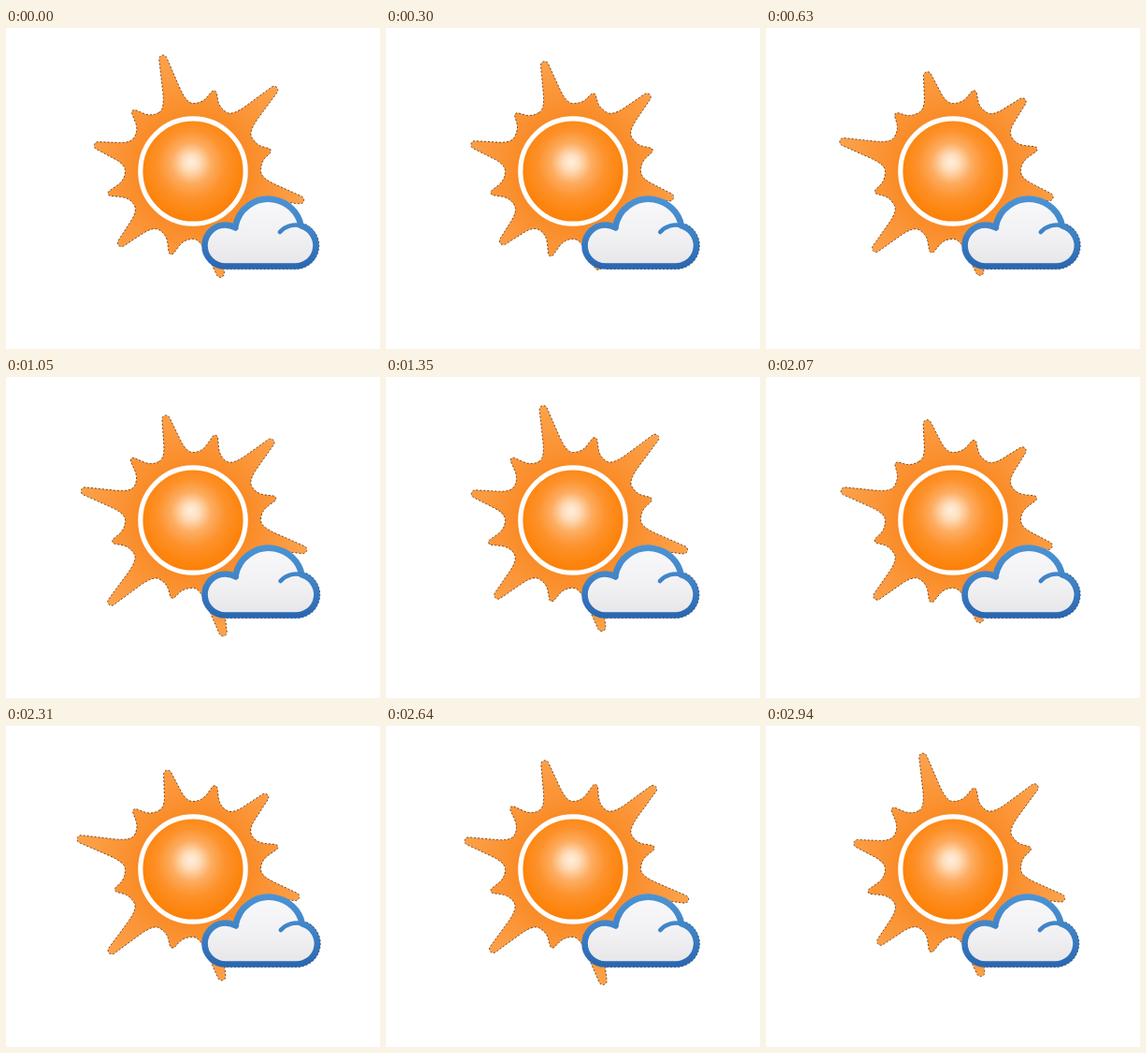
Write an HTML page with a canvas that moves like this. It is 400 by 343 pixels and loops after 2970 ms.

```html
<!DOCTYPE html>
<html lang="en">
<head>
<meta charset="utf-8">
<title>Sun and cloud</title>
<style>
html, body { margin: 0; width: 100%; height: 100%; overflow: hidden; background: #fff; }
canvas { display: block; }
</style>
</head>
<body>
<canvas id="stage" width="400" height="343"></canvas>
<script>
const ctx = document.getElementById('stage').getContext('2d');
const TAU = Math.PI * 2, DEG = Math.PI / 180;
const CX = 200, CY = 153;
const LOOP = 2970, STEP = 30, CYCLES = 2;
const VALLEY = 72.5;

const LONG = { mid: 118.5, amp: 9.7, start: 0, lag: 0.09, tip: 4.2, cap: 80, ctrl: [71.8, 12], bend: 0.36 };
const SHORT = { mid: 90, amp: 4, start: 0.71, lag: 0.18, tip: 3, cap: 63, ctrl: [72.4, 10.2], bend: 0.5 };

function gradient(g, stops) {
  stops.forEach(([at, color]) => g.addColorStop(at, color));
  return g;
}

const rayFill = gradient(ctx.createRadialGradient(CX, CY, 55, CX, CY, 130),
  [[0, '#f98a24'], [0.35, '#fb9436'], [1, '#fda44e']]);
const discFill = gradient(ctx.createRadialGradient(198, 143, 0, 199, 147, 60),
  [[0, '#feefdf'], [0.14, '#fedebd'], [0.36, '#fdac60'], [0.6, '#fd922c'], [0.85, '#fd8610'], [1, '#fb8009']]);
const cloudFill = gradient(ctx.createLinearGradient(0, 184, 0, 254),
  [[0, '#f8f8fa'], [0.55, '#f1f1f3'], [1, '#e6e6e9']]);
const cloudEdge = gradient(ctx.createLinearGradient(0, 180, 0, 258),
  [[0, '#4c94d4'], [0.5, '#3f82c6'], [1, '#2965b0']]);

// Maps a point given along (u) and across (w) a ray to the stage.
function place(angle, u, w) {
  const c = Math.cos(angle), s = Math.sin(angle);
  return [CX + u * c - w * s, CY + u * s + w * c];
}

function addRay(kind, k, angle, phase) {
  const wave = Math.cos(TAU * (phase - kind.start + kind.lag * k));
  const end = kind.mid + kind.amp * wave - kind.tip;
  const at = (u, w) => place(angle, u, w);
  const [cu, cw] = kind.ctrl;
  const bu = cu + (end - cu) * kind.bend;
  const bw = cw + (kind.tip - cw) * kind.bend;
  ctx.quadraticCurveTo(...at(cu, -cw), ...at(bu, -bw));
  ctx.arc(...at(end, 0), kind.tip, angle - kind.cap * DEG, angle + kind.cap * DEG);
  ctx.lineTo(...at(bu, bw));
  ctx.quadraticCurveTo(...at(cu, cw), ...place(angle + 15 * DEG, VALLEY, 0));
}

function strokeDashed(color) {
  ctx.setLineDash([2, 2]);
  ctx.lineWidth = 1;
  ctx.strokeStyle = color;
  ctx.stroke();
  ctx.setLineDash([]);
}

function drawSun(phase) {
  ctx.beginPath();
  ctx.moveTo(...place(240 * DEG, VALLEY, 0));
  for (let k = 0; k < 6; k++) {
    const angle = (255 + 60 * k) * DEG;
    addRay(LONG, k, angle, phase);
    addRay(SHORT, k, angle + 30 * DEG, phase);
  }
  ctx.closePath();
  ctx.fillStyle = rayFill;
  ctx.fill();
  strokeDashed('rgba(60, 30, 6, 0.75)');

  ctx.beginPath();
  ctx.arc(CX, CY, 56.2, 0, TAU);
  ctx.fillStyle = discFill;
  ctx.fill();
  ctx.lineWidth = 5.2;
  ctx.strokeStyle = '#fff';
  ctx.stroke();
}

function drawCloud(phase) {
  const stretch = 1 + 0.006 * (1 - Math.cos(TAU * phase));
  ctx.save();
  ctx.translate(209, 0);
  ctx.scale(stretch, 1);
  ctx.translate(-209, 0);
  ctx.lineJoin = ctx.lineCap = 'round';
  ctx.fillStyle = cloudFill;
  ctx.strokeStyle = cloudEdge;
  ctx.beginPath();
  ctx.arc(234.5, 232.5, 22, Math.PI / 2, -60 * DEG);
  ctx.arc(280.5, 218.5, 35.8, Math.PI + 0.16, -0.2);
  ctx.arc(309.5, 232.5, 22, -73 * DEG, Math.PI / 2);
  ctx.closePath();
  ctx.fill();
  ctx.lineWidth = 6.6;
  ctx.stroke();
  ctx.beginPath();
  ctx.arc(309.5, 232.5, 22, -139 * DEG, -73 * DEG);
  ctx.lineWidth = 4.6;
  ctx.stroke();

  ctx.lineCap = 'butt';
  ctx.beginPath();
  ctx.arc(309.5, 232.5, 25.3, -65 * DEG, Math.PI / 2);
  ctx.lineTo(234.5, 257.8);
  strokeDashed('rgba(12, 40, 80, 0.6)');
  ctx.restore();
}

function draw(now) {
  const t = Math.floor((now % LOOP) / STEP) * STEP;
  const phase = CYCLES * t / LOOP;
  ctx.fillStyle = '#fff';
  ctx.fillRect(0, 0, 400, 343);
  drawSun(phase);
  drawCloud(phase);
}

let begin = null;
function tick(now) {
  if (begin === null) begin = now;
  draw(Math.max(0, now - begin));
  requestAnimationFrame(tick);
}
draw(0);
requestAnimationFrame(tick);
</script>
</body>
</html>
```
